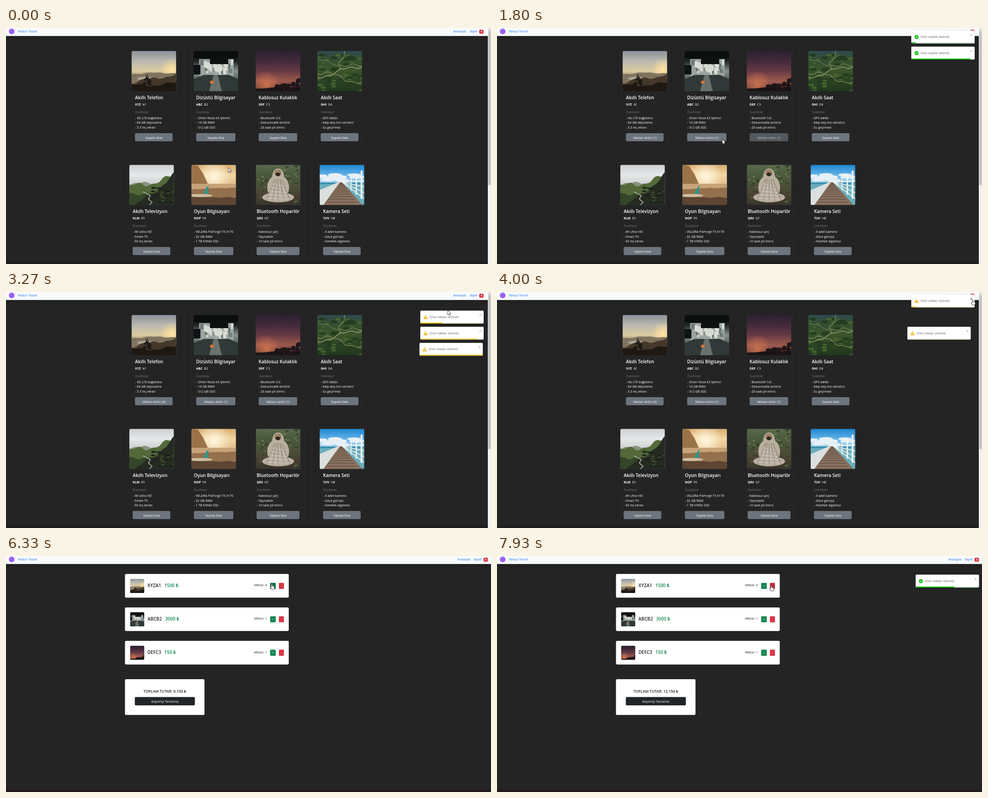
Recreate the animation shown at these times as an HTML page with a canvas. Size 1070 by 523 pixels, loop 8 s.

```html
<!DOCTYPE html>
<html lang="tr">
<head>
<meta charset="utf-8">
<title>Redux Thunk</title>
<style>
html, body { margin: 0; width: 100%; height: 100%; overflow: hidden; background: #242424; }
canvas { display: block; }
</style>
</head>
<body>
<canvas id="stage" width="1070" height="523"></canvas>
<script>
const c = document.getElementById('stage').getContext('2d');
const LOOP = 8000, CART = 5070, LOADED = 5600;
const SANS = '"Open Sans", "Noto Sans", sans-serif', ARIAL = '"Liberation Sans", sans-serif';
const GRAY = '#6c757d', GREEN = '#198754', RED = '#dc3545', INK = '#212529', PAGE = '#242424';
const BODY = 7, TITLE = 10.1;

const clamp = v => Math.min(1, Math.max(0, v));
const mix = (a, b, p) => a + (b - a) * p;
const smooth = p => p * p * (3 - 2 * p);
const easeOut = p => 1 - (1 - p) ** 3;

function widthOf(s, size, weight = 500, family = SANS) {
  c.font = `${weight} ${size}px ${family}`;
  return c.measureText(s).width;
}
function text(s, x, y, size, color, weight = 500, align = 'left', family = SANS) {
  const w = widthOf(s, size, weight, family);
  c.textAlign = align;
  c.fillStyle = color;
  c.fillText(s, x, y + size * 0.36);
  return w;
}
function rect(x, y, w, h, color, r = 0) {
  c.fillStyle = color;
  c.beginPath();
  c.roundRect(x, y, w, h, r);
  c.fill();
}
function disc(x, y, rx, color, ry = rx) {
  c.fillStyle = color;
  c.beginPath();
  c.ellipse(x, y, rx, ry, 0, 0, 7);
  c.fill();
}
function trace(pts) {
  c.beginPath();
  for (let i = 0; i < pts.length; i += 2) c.lineTo(pts[i], pts[i + 1]);
}
function poly(color, ...pts) {
  trace(pts);
  c.fillStyle = color;
  c.fill();
}
function line(color, width, ...pts) {
  trace(pts);
  c.strokeStyle = color;
  c.lineWidth = width;
  c.stroke();
}

// Pictures are painted on a W x H field.
const W = 98, H = 89;

function sky(...colors) {
  const g = c.createLinearGradient(0, 0, 0, H);
  colors.forEach((col, i) => g.addColorStop(i / (colors.length - 1), col));
  rect(0, 0, W, H, g);
}
function glow(x, y, r, rgb) {
  const g = c.createRadialGradient(x, y, 0, x, y, r);
  g.addColorStop(0, `rgba(${rgb},1)`);
  g.addColorStop(1, `rgba(${rgb},0)`);
  rect(0, 0, W, H, g);
}
function wavy(from, to, amp, phase) {
  const pts = [];
  for (let x = 0; x <= W; x += 2)
    pts.push(x, mix(from, to, x / W) + amp * (Math.sin(x * 0.08 + phase) + 0.4 * Math.sin(x * 0.23 + phase * 3)));
  return pts;
}
const ridge = (color, from, to, amp, phase) => poly(color, ...wavy(from, to, amp, phase), W, H, 0, H);
const trail = (width, from, to, amp, phase) => line('#a5a27a', width, ...wavy(from, to, amp, phase));

function scatter(count, seed, draw) {
  const rand = () => (seed = seed * 16807 % 2147483647) / 2147483647;
  rand();
  for (let i = 0; i < count; i++) draw(rand() * W, rand() * H, rand());
}

const pictures = [
  function valley() {
    sky('#8b929c', '#bab8ae', '#dccba2', '#6b5c47', '#2a221a');
    glow(90, 42, 28, '255,226,160');
    ridge('#80745f', 50, 48, 1.5, 1);
    disc(30, 61, 18, '#a9a598', 4);
    ridge('#43382a', 70, 52, 3, 2);
    ridge('#1d1813', 77, 72, 3, 4);
    scatter(14, 5, (x, y, r) => disc(34 + (x - 49) * y / 400, 52 + y / 4, 1 + y / 30, '#1d1813'));
  },
  function street() {
    sky('#0e1312', '#1d2423', '#87938f', '#4d5754', '#252c2b');
    rect(12, 18, 76, 38, '#9aa5a1');
    scatter(40, 9, (x, y, r) =>
      rect(12 + x * 0.72, 18 + y * 0.25, 2 + 5 * r, 8 + 8 * r, r > 0.5 ? '#d8dcd2' : '#66726f'));
    poly('#303938', 0, 62, 22, 53, 78, 53, W, 62, W, H, 0, H);
    poly('#69726c', 34, H, 44, 53, 53, 53, 62, H);
    rect(0, 0, W, 16, '#0a0e0d');
    rect(36, 14, 40, 15, '#0d1110');
    rect(0, 31, 15, 21, '#0e1415');
    rect(36, 66, 8, 6, '#d9703c', 1);
  },
  function night() {
    sky('#2a2030', '#432a39', '#653a45', '#9c594c', '#5a3430');
    glow(24, 74, 30, '200,112,78');
    scatter(26, 3, (x, y, r) => disc(x, y * 0.6, 0.3 + r * 0.3, '#8d7480'));
    scatter(26, 8, (x, y, r) => disc(45 + x * 0.53, 80 - y * x / 500, 3 + 3 * r, '#201719'));
    ridge('#1b1416', 83, 79, 0.6, 1);
  },
  function fields() {
    sky('#2f4a4d', '#33502f', '#3a552b', '#2b4424', '#22371f');
    scatter(60, 4, (x, y, r) => disc(x, 8 + y, 3 + 7 * r, r > 0.6 ? '#253c20' : '#46602f', 2 + 2 * r));
    trail(1.4, 58, 32, 4, 0);
    trail(1, 46, 70, 5, 2);
    trail(0.8, 22, 36, 4, 4);
    line('#a5a27a', 1, 60, 0, 58, 16, 46, 26, 52, 42);
  },
  function hills() {
    sky('#cdd0d3', '#e6e8e9', '#cbd0d0', '#6b7a59', '#3a482c');
    ridge('#87937f', 46, 32, 4, 3);
    ridge('#53693a', 50, 28, 6, 4);
    ridge('#34462a', 58, 84, 5, 1);
    ridge('#262b22', 104, 22, 5, 2.5);
    scatter(30, 6, (x, y, r) => disc(52 + x * 0.45, 48 + y * 0.4, 2 + 4 * r, r > 0.5 ? '#1c201b' : '#3c4a2e', 2));
    line('#b6bab4', 1.6, 30, 60, 46, 68, 42, 76, 50, 83, 44, H);
  },
  function beach() {
    sky('#d8ad72', '#f2d5a0', '#e3bd8c', '#94704e', '#3f3025');
    glow(50, 26, 38, '255,247,222');
    poly('#9a7248', 0, 0, 14, 2, 26, 20, 36, 42, 0, 46);
    rect(0, 42, W, 9, '#c7a278');
    ridge('#94704d', 54, 50, 0.7, 1);
    ridge('#5d4532', 68, 74, 1.5, 4);
    disc(20, 68, 26, '#cdbd9c', 3.5);
    poly('#2f958b', 26, 64, 33, 50, 38, 46, 36, 58, 38, 64);
  },
  function blanket() {
    sky('#5a694b', '#4a593c', '#4c5138', '#4b4236', '#3a3229');
    scatter(70, 7, (x, y, r) => disc(x, y, 1 + 4 * r, r > 0.5 ? '#36452e' : '#667a4d', 2));
    const wool = '#b9afa0';
    disc(49, 72, 35, wool, 11);
    disc(49, 50, 24, wool, 28);
    disc(49, 26, 13, wool, 18);
    for (let i = -2; i <= 2; i++) {
      line('#85786d', 1.2, 49 + i * 4, 32, 49 + i * 13, 79);
      line('#cfc7b9', 1.4, 30 - i * 3, 58 + i * 8, 68 + i * 3, 62 + i * 7);
    }
    disc(48.5, 18, 8, '#9b8262');
    disc(48.5, 21, 5, '#2e2722', 4);
  },
  function pier() {
    sky('#1f86d2', '#62b2e6', '#d4e9f2', '#5aa4b2', '#437f8b');
    scatter(16, 2, (x, y, r) => disc(x, 22 + y / 7, 8 + 10 * r, '#e6f1f6', 2 + 2 * r));
    rect(0, 39, W, 50, '#6aaebb');
    rect(0, 39, W, 4, '#3c8fae');
    poly('#dbe0de', 0, 56, 42, 38, 48, 38, 12, H, 0, H);
    poly('#87705e', 8, H, 44, 39, 50, 39, 94, H);
    for (let i = 1; i < 12; i++) {
      const y = 39 + 50 * (i / 12) ** 1.6, d = (y - 39) * 0.75;
      line('#574439', 1, 46 - d, y, 49 + d, y);
    }
    for (let i = 0; i < 4; i++) {
      line('#f0f3f3', 1.8, 49, 38, W, 36 + i * 13);
      rect(57 + i * 11, 34 - i * 7, 1 + i, 14 + i * 16, '#f0f3f3');
    }
  }
];

function picture(i, x, y, w, h, r) {
  c.save();
  c.beginPath();
  c.roundRect(x, y, w, h, r);
  c.clip();
  c.translate(x, y);
  c.scale(w / W, h / H);
  pictures[i]();
  c.restore();
}

const product = (name, brand, model, ...features) => ({ name, brand, model, features: features.map(f => '- ' + f) });
const products = [
  product('Akıllı Telefon', 'XYZ', 'A1', '4G LTE bağlantısı', '64 GB depolama', '5.5 inç ekran'),
  product('Dizüstü Bilgisayar', 'ABC', 'B2', 'Orbin Nova k5 işlemci', '16 GB RAM', '512 GB SSD'),
  product('Kablosuz Kulaklık', 'DEF', 'C3', 'Bluetooth 5.0', 'Dokunmatik kontrol', '20 saat pil ömrü'),
  product('Akıllı Saat', 'GHI', 'D4', 'GPS takibi', 'Kalp atış hızı sensörü', 'Su geçirmez'),
  product('Akıllı Televizyon', 'KLM', 'E5', '4K Ultra HD', 'Smart TV', '50 inç ekran'),
  product('Oyun Bilgisayarı', 'NOP', 'F6', 'VELDRA PixForge TX 4170', '32 GB RAM', '1 TB NVMe SSD'),
  product('Bluetooth Hoparlör', 'QRS', 'G7', 'Kablosuz şarj', 'Taşınabilir', '10 saat pil ömrü'),
  product('Kamera Seti', 'TUV', 'H8', '4 adet kamera', 'Gece görüşü', 'Hareket algılama')
];

// Cards grow with their widest text; each row of four is centred.
const GAP = 21.3, MIDDLE = 531.3, ROW = 252.2;
for (const p of products) {
  p.inner = Math.max(83, widthOf(p.name, TITLE, 600), ...p.features.map(f => widthOf(f, BODY)));
  p.width = Math.max(114.5, p.inner + 30);
}
for (let row = 0; row < 2; row++) {
  const cards = products.slice(row * 4, row * 4 + 4);
  let x = MIDDLE - (cards.reduce((sum, p) => sum + p.width, 0) + 3 * GAP) / 2;
  for (const p of cards) {
    p.mid = x + p.width / 2;
    p.top = row * ROW;
    x += p.width + GAP;
  }
}

const toast = (born, item, label, warn, end = born + 1200) => ({ born, item, label, warn, end });
const added = (born, item) => toast(born, item, 'Ürün sepete eklendi');
const raised = (born, end) => toast(born, 0, 'Ürün miktarı arttırıldı', true, end);
const shopToasts = [added(635, 0), added(1065, 1), added(1685, 2), raised(2245, 4330), raised(2520), raised(2680)];
const cartToasts = [6490, 7035].map(born => toast(born, 0, 'Ürün miktarı arttırıldı.'));

function bounceIn(p) {
  const stops = [[0, 3000], [0.6, -25], [0.75, 10], [0.9, -5], [1, 0]];
  const k = Math.max(1, stops.findIndex(s => p <= s[0]));
  const [p0, x0] = stops[k - 1], [p1, x1] = stops[k];
  return mix(x0, x1, easeOut((p - p0) / (p1 - p0)));
}
function bounceOut(p) {
  const ease = q => 1 - (1 - q) ** 2.3;
  return p < 0.2 ? -20 * ease(p / 0.2) : mix(-20, 2000, ease((p - 0.2) / 0.8));
}

function drawToast(n, home, y, t) {
  const leaving = t > n.end, held = n.end > n.born + 1200 && t > 3400 && !leaving;
  const inP = clamp((t - n.born) / 700), outP = clamp((t - n.end) / 700);
  const x = home + 0.4375 * (leaving ? bounceOut(outP) : bounceIn(inP));
  if (x > 1070) return;
  const color = n.warn ? '#f1c40f' : '#07bc0c';
  c.save();
  c.globalAlpha = leaving ? 1 - clamp((outP - 0.2) / 0.8) : clamp(inP / 0.6);
  c.shadowColor = 'rgba(0,0,0,.1)';
  c.shadowBlur = 4;
  rect(x, y, 139.8, 28.6, '#fff', 2);
  c.shadowColor = 'transparent';
  const ix = x + 11.5, iy = y + 14.4;
  if (n.warn) {
    poly('#f5b921', ix, iy - 5, ix + 5, iy + 4.3, ix - 5, iy + 4.3);
    line('#fff', 1.1, ix, iy - 1.8, ix, iy + 1.4);
    rect(ix - 0.6, iy + 2.2, 1.2, 1.1, '#fff');
  } else {
    disc(ix, iy, 4.5, color);
    line('#fff', 1.2, ix - 2.2, iy, ix - 0.6, iy + 1.7, ix + 2.3, iy - 1.6);
  }
  text(n.label, x + 20, y + 14.2, 7.15, '#757575', 400, 'left', ARIAL);
  const cx = x + 132.5, cy = y + 9.8;
  for (const d of [-2, 2]) line(held ? '#111' : '#999', 0.9, cx - d, cy - 2, cx + d, cy + 2);
  const rest = leaving ? 0 : Math.max(clamp(1 - (t - n.born - 700) / 500), held ? 0.07 : 0);
  c.beginPath();
  c.roundRect(x, y, 139.8, 28.6, 2);
  c.clip();
  rect(x, y + 26.4, 139.8, 2.2, color + '33');
  rect(x, y + 26.4, 139.8 * rest, 2.2, color);
  c.restore();
}
function drawToasts(list, home, t) {
  let slot = 0;
  for (const n of list) {
    if (t < n.born) break;
    if (t < n.end + 700) drawToast(n, home, 5.6 + 35.7 * slot, t);
    slot += 1 - clamp((t - n.end - 700) / 100);
  }
}

function navbar(shift, count) {
  c.save();
  c.shadowColor = 'rgba(0,0,0,.25)';
  c.shadowBlur = 7;
  c.shadowOffsetY = 3;
  rect(0, -4, 1070, 21.7, '#f8fbfd');
  c.restore();
  disc(12.5, 7.5, 6.3, '#9a62f5');
  const blue = '#1a73ec';
  text('Redux Thunk', 26.5, 8, 6.9, blue, 400);
  text('Anasayfa', 986.6 + shift, 7.6, 6.7, blue, 400);
  text('Sepet', 1022.2 + shift, 7.6, 6.7, blue, 400);
  rect(1044 + shift, 3.7, 9.7, 9, RED, 2.6);
  text(count, 1048.9 + shift, 8.2, 5.2, '#fff', 700, 'center');
}

function card(p, i, t) {
  const y = p.top, x = p.mid - p.inner / 2 - 0.3;
  c.save();
  c.shadowColor = 'rgba(0,0,0,.16)';
  c.shadowBlur = 5;
  rect(p.mid - p.width / 2, 41 + y, p.width, 227, PAGE, 3);
  c.restore();
  picture(i, p.mid - 49.2, 51 + y, 98.3, 89, 3);
  text(p.name, x, 154.2 + y, TITLE, '#fff', 600);
  const w = text(p.brand, x, 169.3 + y, BODY, '#fff', 700);
  text(p.model, x + w + 3.5, 169.3 + y, BODY, '#fff');
  text('Özellikler', x, 186 + y, BODY, GRAY);
  p.features.forEach((f, k) => text(f, x, 199.3 + k * 10.6 + y, BODY, '#fff'));

  const adds = shopToasts.filter(n => n.item === i && n.born <= t);
  c.globalAlpha = adds.some(n => t - n.born < 250) ? 0.65 : 1;
  rect(x, 233 + y, p.inner, 18, GRAY, 2.4);
  text(adds.length ? `Miktarı Arttır (${adds.length})` : 'Sepete Ekle', p.mid, 243 + y, BODY, '#fff', 500, 'center');
  c.globalAlpha = 1;
}

function shop(t) {
  products.forEach((p, i) => card(p, i, t));
  rect(0, 518.5, 1063, 4.5, '#1f1b1b');
  navbar(0, shopToasts.filter(n => n.born <= t).length);
  drawToasts(shopToasts, 914, t);
  rect(1063, 0, 7, 523, '#f1f1f1');
  rect(1064, 6.5, 5.5, 341.5, '#c1c1c1');
  poly('#777', 1064.8, 4.2, 1066.7, 2, 1068.6, 4.2);
}

function smallButton(x, y, w, color, sign) {
  rect(x, y, w, 13.6, color, 1.8);
  text(sign, x + w / 2, y + 7, 6, '#fff', 400, 'center');
}

function cart(t) {
  const extra = cartToasts.filter(n => n.born <= t).length;
  const loading = t < LOADED, top = loading ? 58.2 : 39.8;
  let total = 0;
  if (loading) text('Yükleniyor', 263, 47.5, 11.4, '#f4f4f4', 600);
  [1500, 3000, 150].forEach((price, i) => {
    const y = top + 74.1 * i, { brand, model } = products[i], amount = i ? 1 : 4 + extra;
    total += price * amount;
    rect(262.5, y, 361.3, 52.4, '#fff', 2.8);
    picture(i, 273.7, y + 10.7, 31.4, 31.4, 3.5);
    const w = text(brand + model, 312, y + 25.3, 10, INK, 600);
    text(price + ' ₺', 319 + w, y + 25.3, 10, GREEN, 600);
    text('Miktar: ' + amount, 575.7, y + 25, BODY, INK, 500, 'right');
    smallButton(582.7, y + 19.6, 12.5, !i && t > 5870 && t < 7290 ? '#157347' : GREEN, '+');
    smallButton(602, y + 19.6, 11.2, !i && t > 7700 ? '#bb2d3b' : RED, '-');
  });
  const y = top + 233.2;
  rect(262.5, y, 175.4, 79.2, '#fff', 2.8);
  text(`TOPLAM TUTAR: ${(total / 1000).toFixed(3)} ₺`, 350.3, y + 27.2, 8.3, INK, 600, 'center');
  rect(284.2, y + 39.5, 132.5, 18.6, INK, 2.4);
  text('Alışverişi Tamamla', 350.3, y + 49, BODY, '#fff', 500, 'center');
  rect(0, 518.5, 1070, 4.5, '#211818');
  if (loading) text('localhost:5174/sepet', 3, 523, 6.8, '#9c4030', 400);
  navbar(9.5, 6 + extra);
  drawToasts(cartToasts, 923.6, t);
}

const move = (start, end, x, y) => ({ start, end, x, y });
const buyButton = i => products[i].mid;
const moves = [
  move(70, 480, buyButton(0), 241), move(680, 940, buyButton(1), 243),
  move(1120, 1420, buyButton(2), 251), move(1640, 2012, buyButton(0) + 16.5, 241.5),
  move(2760, 3400, 1049.5, 17.5), move(4420, 4800, 1034, 9),
  move(5250, 5870, 586.5, 62.5), move(7290, 7700, 605, 66)
];
const arrow = new Path2D('M0 0V9L2 7.2 3.4 10.4 4.8 9.8 3.5 6.7H6.2Z');
const hand = new Path2D('M-.8 1Q0-.3.8 1V4L4.4 4.9Q5.6 5.3 5.3 6.8L4.6 11H.2L-2.8 7.2Q-3 5.6-1.8 6.1L-.8 7Z');

function pointer(t) {
  let x = 490.5, y = 310;
  for (const m of moves) {
    const p = smooth(clamp((t - m.start) / (m.end - m.start)));
    x = mix(x, m.x, p);
    y = mix(y, m.y, p);
  }
  const still = t > moves[0].start && !moves.some(m => t > m.start && t < m.end);
  const shape = still ? hand : arrow;
  c.save();
  c.translate(x, y);
  c.lineJoin = 'round';
  c.lineWidth = 1.4;
  c.strokeStyle = '#111';
  c.stroke(shape);
  c.fillStyle = '#fff';
  c.fill(shape);
  c.restore();
}

function frame() {
  const t = performance.now() % LOOP;
  rect(0, 0, 1070, 523, PAGE);
  (t < CART ? shop : cart)(t);
  pointer(t);
  requestAnimationFrame(frame);
}
frame();
</script>
</body>
</html>
```
